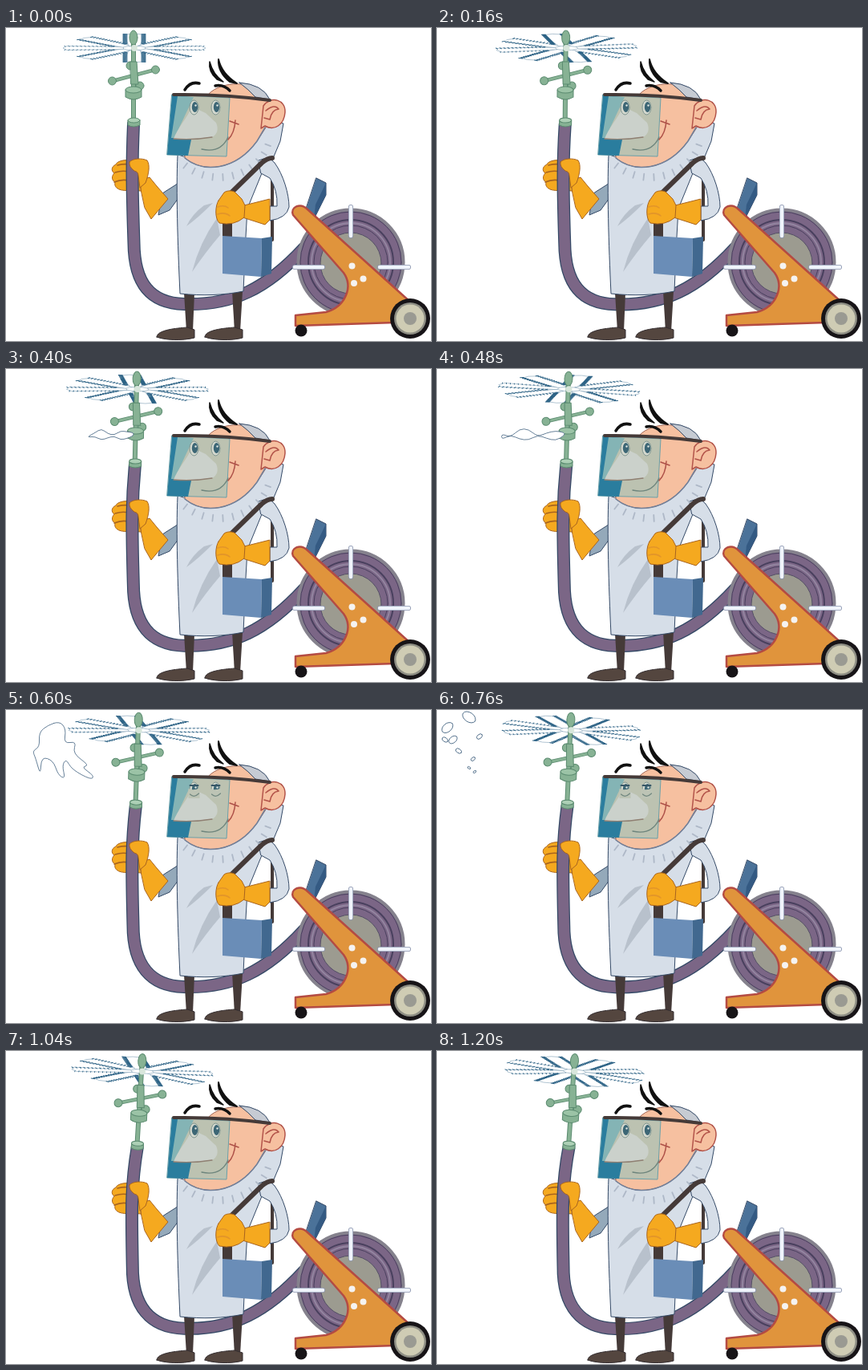
Write an HTML page with a canvas that moves like this. It is 530 px wide and 390 px high and loops after 1.24 s.

```html
<!DOCTYPE html>
<html lang="en">
<head>
<meta charset="utf-8">
<title>Cleaner with spinning brush</title>
<style>
html, body { margin: 0; width: 100%; height: 100%; overflow: hidden; background: #fff; }
canvas { display: block; }
</style>
</head>
<body>
<canvas id="stage" width="530" height="390"></canvas>
<script>
const ctx = document.getElementById('stage').getContext('2d');
const LOOP = 1240, STEP = 40;
const SPIN = 25 / 3 * Math.PI / 180; // brush turn per step
const NAVY = '#344966', PURPLE = '#7b6686', ORANGE = '#f5a91f', OCHRE = '#a8641f', RUST = '#b5482f',
      GREEN = '#87b294', DARKGREEN = '#5b8b70', BROWN = '#453a38', CLOTH = '#d6dee8', SKIN = '#f6c0a0';

function paint(path, fill, line, width = 1) {
  if (fill) { ctx.fillStyle = fill; ctx.fill(path); }
  if (line) { ctx.strokeStyle = line; ctx.lineWidth = width; ctx.stroke(path); }
}
const shape = (d, fill, line, width) => paint(new Path2D(d), fill, line, width);
const stroke = (d, color, width) => shape(d, null, color, width);

function oval(x, y, rx, ry, fill, line, width, angle = 0) {
  const p = new Path2D();
  p.ellipse(x, y, rx, ry, angle, 0, Math.PI * 2);
  paint(p, fill, line, width);
}
const disc = (x, y, r, fill, line, width) => oval(x, y, r, r, fill, line, width);

function hose(p) {
  const d = `M${159 + 5.5 * p} 120 C${157 - p} 165 ${157 - p} 195 ${159.5 - 2 * p} 268
    C${160 - 3 * p} 318 180 ${343 + 2 * p} 222 ${344 + 2 * p} C282 ${346 + 2 * p} 325 325 372 274`;
  stroke(d, NAVY, 16);
  stroke(d, PURPLE, 13.5);
}

function brushes(turn) {
  for (let i = 0; i < 8; i++) {
    const body = new Path2D(), bristles = new Path2D();
    const a = turn + i * Math.PI / 4, c = Math.cos(a), s = Math.sin(a);
    const at = (r, w) => [r * c - w * s, 0.2 * (r * s + w * c)];
    body.moveTo(...at(14, -7));
    for (const [r, w] of [[84, -13], [89, 0], [84, 13], [14, 7]]) body.lineTo(...at(r, w));
    body.closePath();
    for (let r = 26; r < 88; r += 5) {
      for (const side of [-1, 1]) {
        bristles.moveTo(...at(r, side * 9));
        bristles.lineTo(...at(r + 1, side * 14));
      }
    }
    paint(body, '#fff', '#7f9fb5', 0.6);
    paint(bristles, null, '#2c6285', 1);
  }
}

function nozzle(p, turn) {
  ctx.save();
  ctx.translate(157, 190);
  ctx.rotate(0.07 * p);
  ctx.translate(-157, -190);
  ctx.save();
  ctx.translate(160, 25);
  brushes(turn);
  ctx.restore();
  stroke('M159 8 V118', DARKGREEN, 6);
  stroke('M159 8 V118', GREEN, 4);
  oval(159, 12, 5, 9, GREEN, DARKGREEN);
  disc(160, 25, 4, '#d8e6dc');
  stroke('M133 66 L186 52', DARKGREEN, 4.5);
  stroke('M133 66 L186 52', GREEN, 3);
  for (const [x, y] of [[132.5, 66], [186.5, 52], [155, 47], [167, 72]]) disc(x, y, 5, GREEN, DARKGREEN);
  shape('M155 42 H163 L165 70 H156Z', GREEN, DARKGREEN);
  shape('M149 77 V86 Q159 92 169 86 V77Z', GREEN, DARKGREEN);
  oval(159, 77, 10, 4, '#9bc3a6', DARKGREEN);
  shape('M152 115 V121 Q159 125 167 121 V115Z', GREEN, DARKGREEN);
  oval(159.5, 115, 7.5, 3, '#add0b6', DARKGREEN);
  ctx.restore();
}

function reel() {
  shape('M387 187 L399 193 L399 208 L384 238 L373 229Z', '#4b7299', NAVY);
  shape('M399 193 V208 L384 238 L386 220Z', '#345a83');
  disc(430, 292, 65.5, PURPLE, '#85828d', 4);
  disc(430, 292, 63, null, '#49405e', 1);
  disc(430, 292, 53, null, '#49405e', 2);
  disc(430, 292, 49, null, '#9385a0', 2);
  disc(430, 292, 46, null, '#49405e', 1);
  disc(430, 293, 38, '#9c9b90', '#555166', 1);
  for (const d of ['M430 223 V259', 'M360 298 H395', 'M466 298 H502']) {
    stroke(d, '#8a94ad', 6);
    stroke(d, '#f0f4fc', 4.5);
  }
}

function cart() {
  shape('M358 233 C354 223 367 217 376 226 L506 343 L485 367 L361 371 V358 L399 354 C424 347 433 322 421 305Z',
    '#e0943c', '#b44b43', 2.5);
  disc(368, 377, 7.5, '#171417');
  disc(504, 362, 25, '#171417');
  disc(504, 362, 20, '#8f8f85');
  disc(504, 362, 17.5, '#cfccb4');
  disc(504, 362, 8, '#9a9a92');
  for (const [x, y] of [[431.5, 296.5], [445.5, 312.5], [434, 318]]) disc(x, y, 4, '#f5f3f1');
}

function leftArm() {
  shape('M217 192 L195 206 L190 233 L204 227 L215 212Z', '#94a9ba', NAVY);
  shape('M166 190 L179 186 L188 197 L202 213 L181 238 L173 224Z', ORANGE, OCHRE);
  shape('M164 166 C150 163 139 165 137 170 C131 173 131 178 135 181 C131 185 132 190 136 192 C134 200 143 204 157 202 L168 203Z',
    ORANGE, OCHRE);
  stroke('M136 180 Q145 177 153 179 M135 192 Q144 188 153 190 M139 171 Q147 169 154 170', OCHRE, 1.6);
}

function thumb() {
  shape('M154 167 C158 162 170 162 176 165 C180 171 178 182 174 193 L167 199 L165 184 Q165 179 160 178 Q153 173 154 167Z',
    ORANGE, OCHRE);
}

function body() {
  // legs and shoes
  shape('M222 330 H235 L233 378 H225Z', BROWN);
  shape('M282 328 H295 L292 378 H285Z', BROWN);
  shape('M188 385 C188 376 213 374 226 373 L235 376 V386 C220 390 197 389 188 385Z', '#54463f', '#332d30');
  shape('M248 385 C248 376 272 374 285 373 L295 376 V386 C282 390 257 389 248 385Z', '#54463f', '#332d30');
  // strap, gown with beard, and sleeve
  stroke('M332 180 V264', BROWN, 4);
  shape('M214 158 C212 204 214 267 217 331 C245 334 272 333 296 328 L299 260 L301 225 L319 181 L334 160 L342 141 L346 119 L308 111 L222 160Z',
    CLOTH, NAVY);
  shape('M315 165 Q328 159 335 168 C346 183 353 207 353 223 Q350 237 329 240 L329 222 L338 222 Q339 202 329 187 L318 181Z',
    CLOTH, NAVY);
  shape('M247 221 Q232 232 225 247 Q239 237 258 218Z', '#b8c1cc');
  shape('M263 237 Q241 268 232 304 Q249 279 267 258Z', '#b8c1cc');
}

function bag() {
  stroke('M332 162 Q326 162 319 168 L277 209', BROWN, 6);
  shape('M270 236 H282 V264 H270Z', BROWN);
  shape('M270 259 L319 262 L318 310 L270 306Z', '#6a8db7');
  shape('M319 262 L332 260 L331 306 L318 310Z', '#41688f');
}

function rightGlove() {
  shape('M293 222 L329 213 L329 239 L323 245 L295 236Z', ORANGE, OCHRE);
  shape('M265 215 L272 205 C276 202 284 202 287 206 L294 213 L298 221 L297 236 Q284 247 266 243 C260 237 261 221 265 215Z',
    ORANGE, OCHRE);
  stroke('M264 223 Q272 220 277 224 M264 232 Q273 229 279 234', '#e2952a', 1.5);
}

function eye(x, blink) {
  oval(x, 99, 5.5, 9, '#d5d9cf', '#7d948f', 1);
  oval(x + 1, 98.5, 3.7, 6.5, '#3c6675');
  disc(x + 2, 96.5, 1.2, '#dce3df');
  if (blink) {
    shape(`M${x - 7} 98 Q${x} 101 ${x + 7} 97 V110 H${x - 7}Z`, '#bdc4b5');
    stroke(`M${x - 5} 105 Q${x} 110 ${x + 6} 104`, '#71877f', 1.2);
    stroke(`M${x - 5} 94 L${x + 5} 94`, '#365666', 2);
  }
}

function head(blink) {
  shape('M253 82 C268 66 310 63 328 89 L324 124 L313 141 C286 178 246 181 223 162 L225 84Z', SKIN, '#9f6657');
  shape('M291 68 Q320 70 329 89 L311 86 Q303 77 291 68Z', '#c6cbd3', NAVY);
  // ear
  shape('M321 97 C330 84 349 89 348 105 C347 120 335 129 323 122 L318 125Z', SKIN, '#b25349', 1.5);
  stroke('M324 103 Q335 94 340 101 Q331 102 329 114 L322 112', '#b25349', 1.6);
  // beard edge
  stroke('M223 162 C246 181 286 178 313 141 L323 124', '#71809a', 1.5);
  for (let i = 0; i < 11; i++) {
    const a = 2.3 - i * 0.2;
    const x = 266 + Math.cos(a) * 60, y = 129 + Math.sin(a) * 53;
    stroke(`M${x} ${y} l${Math.cos(a) * 7} ${Math.sin(a) * 8}`, '#aeb8c7', 1.8);
  }
  // hair and brows
  shape('M254 42 Q258 58 271 67 L263 64 Q252 54 254 42Z', '#111', '#111', 1.5);
  shape('M265 39 Q269 57 288 69 L279 67 Q264 55 265 39Z', '#111', '#111', 2);
  stroke('M223 77 Q230 66 241 69', '#111', 3.5);
  stroke('M261 72 Q271 70 279 78', '#111', 3.5);
  // visor
  shape('M207 83 L279 87 L275 160 L201 158Z', '#bcc2b1', '#6aa0a8', 1);
  shape('M207 84 L232 86 L209 138 L231 139 L227 159 L201 158Z', '#2a7d9e');
  shape('M214 85 L234 86 L210 137 L206 137Z', '#84b4b5');
  shape('M232 98 C226 112 213 126 209 138 C221 140 243 137 257 136 Q267 130 262 118 L249 106Z', '#cbd1cb');
  stroke('M209 138 Q233 140 257 136', '#8f7f72', 1.4);
  eye(234.5, blink);
  eye(261.5, blink);
  stroke('M244 151 C262 155 272 147 277 136', '#6d847c', 1.4);
  stroke('M277 139 Q285 131 286 115 M279 116 L290 120', '#ae5148', 1.5);
  stroke('M209 83 Q270 82 329 90', BROWN, 4);
}

// Points are joined through their midpoints to make a soft closed outline.
function blob(points) {
  const p = new Path2D(), n = points.length;
  const mid = i => {
    const a = points[i % n], b = points[(i + 1) % n];
    return [(a[0] + b[0]) / 2, (a[1] + b[1]) / 2];
  };
  p.moveTo(...mid(0));
  for (let i = 1; i <= n; i++) p.quadraticCurveTo(...points[i % n], ...mid(i));
  paint(p, '#fff', '#41617f', 0.8);
}

function water(t) {
  if (t >= 240 && t < 560) {
    const length = (t - 200) * 0.28, points = [];
    for (let i = 0; i <= 7; i++) points.push([159 - length * i / 7, 79 - Math.min(i * 2, 7) * Math.sin(i * 1.8 + t / 80) * length / 80]);
    for (let i = 7; i >= 0; i--) points.push([159 - length * i / 7, 86 + 4 * Math.sin(i * 2 + t / 90) * length / 80]);
    blob(points);
  } else if (t >= 560 && t < 720) {
    const k = (t - 600) / 160;
    const splash = [[-18, -32], [-3, -37], [5, -27], [2, -9], [18, -12], [13, 3], [34, 18], [24, 20], [40, 31], [36, 36],
      [12, 23], [5, 10], [0, 18], [4, 35], [-5, 30], [-11, 12], [-26, 7], [-27, 31], [-33, 9], [-37, 0], [-28, -5], [-29, -23]];
    blob(splash.map(([x, y]) => [70 - 40 * k + x * (1 - 0.3 * k), 51 - 15 * k + y * (1 - 0.25 * k)]));
  } else if (t >= 720) {
    const age = t - 760, size = 1 - age / 240;
    if (size <= 0) return;
    const drops = [[13, 22, 8, -0.07, -0.04], [40, 9, 9, 0, -0.04], [20, 37, 6, -0.1, -0.05], [10, 37, 4, -0.05, 0],
      [53, 33, 4, -0.04, -0.19], [27, 51, 4, -0.15, -0.07], [45, 61, 3, -0.26, -0.1], [40, 72, 2, -0.27, -0.1], [47, 77, 2, -0.3, -0.1]];
    drops.forEach(([x, y, r, vx, vy], i) => {
      oval(x + vx * age, y + vy * age, r * size, r * 0.65 * size, '#fff', '#41617f', 0.9, i % 2 ? 0.6 : -0.7);
    });
  }
}

function draw(now) {
  const t = Math.floor(now % LOOP / STEP) * STEP, p = t / 1200;
  ctx.clearRect(0, 0, 530, 390);
  leftArm();
  hose(p);
  thumb();
  reel();
  nozzle(p, t / STEP * SPIN);
  water(t);
  body();
  head(t >= 560 && t < 840);
  bag();
  rightGlove();
  cart();
  requestAnimationFrame(draw);
}

ctx.lineJoin = ctx.lineCap = 'round';
requestAnimationFrame(draw);
</script>
</body>
</html>
```
